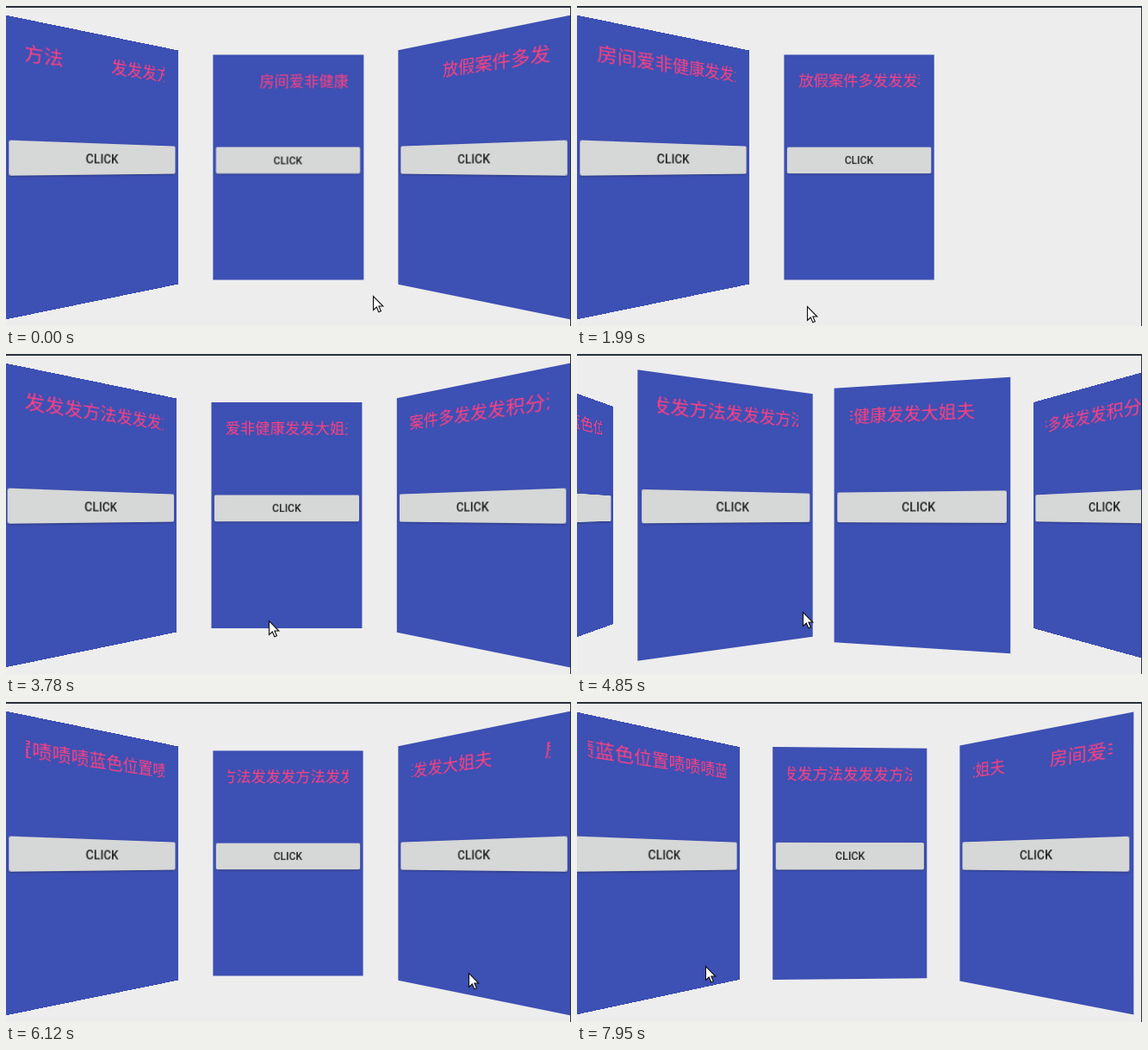
Recreate the animation shown at these times as an HTML page. Size 656x371 px, loop 7.99 s.

```html
<!DOCTYPE html>
<html lang="zh-CN">
<head>
<meta charset="utf-8">
<title>Card pager</title>
<style>
html, body { margin: 0; width: 100%; height: 100%; overflow: hidden; background: #ededed; }
#stage { position: relative; width: 656px; height: 371px; overflow: hidden; background: #ededed; }
.page {
  position: absolute; left: -102.35px; top: -153.5px; width: 204.7px; height: 307px;
  background: #3d50b3;
}
.title {
  position: absolute; left: 20px; top: 19.5px; width: 164.7px; height: 28px; overflow: hidden;
  color: #ff4081; font: 20.3px/28px "Noto Sans CJK SC", "Noto Sans CJK", sans-serif;
}
.title span { position: absolute; left: 0; top: 0; white-space: nowrap; }
.button {
  position: absolute; left: 3.5px; top: 125.8px; width: 197.7px; height: 36.5px;
  border-radius: 2px; background: #d6d7d7; box-shadow: 0 1px 2px rgba(0, 0, 0, .3);
  color: #202020; text-align: center; font: 500 14.2px/37px Roboto, sans-serif;
}
#cursor { position: absolute; left: 0; top: 0; }
#top, #side { position: absolute; right: 0; top: 0; background: #2b313d; }
#top { width: 100%; height: 2px; }
#side { width: 1px; height: 100%; }
</style>
</head>
<body>
<div id="stage">
  <div id="top"></div>
  <div id="side"></div>
  <svg id="cursor" width="16" height="23" viewBox="-1 -1 16 23">
    <path d="M.5.5V16.5L4.3 13L6.8 18.8L9.4 17.7L6.9 12H11.8Z" fill="#fff" stroke="#111" stroke-width="1.1"/>
  </svg>
</div>
<script>
const LOOP = 7990, CENTER_X = 327, CENTER_Y = 186.5, SPACING = 215.4;
const EM = 20.3, GAP = 54.7, SPEED = 0.033, PAUSE = 1200;

// start: when the title sits at the left edge and begins its pause
const pages = [
  { text: "蓝色位置啧啧啧".repeat(3), start: 2645 },
  { text: "发发发方法".repeat(3), start: 2818 },
  { text: "房间爱非健康发发大姐夫", start: 1320 },
  { text: "放假案件多发发发积分法发发发", start: 1320 }
];

const linear = x => x;
const smooth = x => x * x * (3 - 2 * x);
const settle = x => 1 - (1 - x) ** 5;

// [time, centred page, easing towards this key]
const scroll = [
  [0, 2], [690, 2], [820, 2.12], [970, 2.26], [1620, 2.65], [1680, 2.69], [2100, 3, settle],
  [2960, 3], [3290, 2.75], [3400, 2.6], [4044, 2, settle],
  [4330, 2], [4850, 1.68], [5780, 1.125], [6150, 1, settle],
  [6600, 1], [6900, 0.6], [7200, 0, settle], [7330, 0], [7950, 1.046], [7990, 1.1]
];

// [time, x, y]
const pointer = [
  [0, 426, 336], [600, 480, 318], [970, 410, 310], [1680, 317, 316], [1990, 267, 348],
  [2800, 240, 335], [3400, 340, 312], [3780, 305, 309], [4280, 180, 300], [4850, 262, 299],
  [5780, 381, 306], [6120, 537, 314], [6550, 300, 312], [6900, 400, 310], [7250, 388, 308],
  [7950, 149, 306], [7990, 138, 306]
];

function sample(keys, t, column, ease) {
  let i = 1;
  while (i < keys.length - 1 && t > keys[i][0]) i++;
  const a = keys[i - 1], b = keys[i];
  const x = Math.min(1, (t - a[0]) / (b[0] - a[0]));
  return a[column] + (b[column] - a[column]) * (ease || b[2] || linear)(x);
}

const stage = document.getElementById("stage");
const cursor = document.getElementById("cursor");

function add(parent, tag, name, text) {
  const el = document.createElement(tag);
  el.className = name;
  el.textContent = text;
  parent.append(el);
  return el;
}

for (const page of pages) {
  page.el = add(stage, "div", "page", "");
  const title = add(page.el, "div", "title", "");
  page.copies = [-1, 0, 1].map(() => add(title, "span", "", page.text));
  add(page.el, "div", "button", "CLICK");
}
stage.append(document.getElementById("top"), document.getElementById("side"), cursor);

function marquee(t, start) {
  if (t < start) return (start - t) * SPEED;
  return -Math.max(0, t - start - PAUSE) * SPEED;
}

function draw(t) {
  const current = sample(scroll, t, 1);
  pages.forEach((page, i) => {
    const p = i - current;
    const scale = Math.min(1, 0.85 + 0.5 * Math.abs(p));
    page.el.style.visibility = Math.abs(p) < 2 ? "visible" : "hidden";
    page.el.style.transform =
      `translate(${CENTER_X + p * SPACING}px, ${CENTER_Y}px) scale(${scale}) ` +
      `perspective(201.6px) rotateY(${-15 * p}deg)`;
    const x = marquee(t, page.start), period = page.text.length * EM + GAP;
    page.copies.forEach((el, k) => {
      el.style.transform = `translateX(${x + (k - 1) * period}px)`;
    });
  });
  const x = sample(pointer, t, 1, smooth), y = sample(pointer, t, 2, smooth);
  cursor.style.transform = `translate(${x - 1}px, ${y - 1}px)`;
}

const begin = performance.now();
function tick() {
  draw((performance.now() - begin) % LOOP);
  requestAnimationFrame(tick);
}
tick();
</script>
</body>
</html>
```
